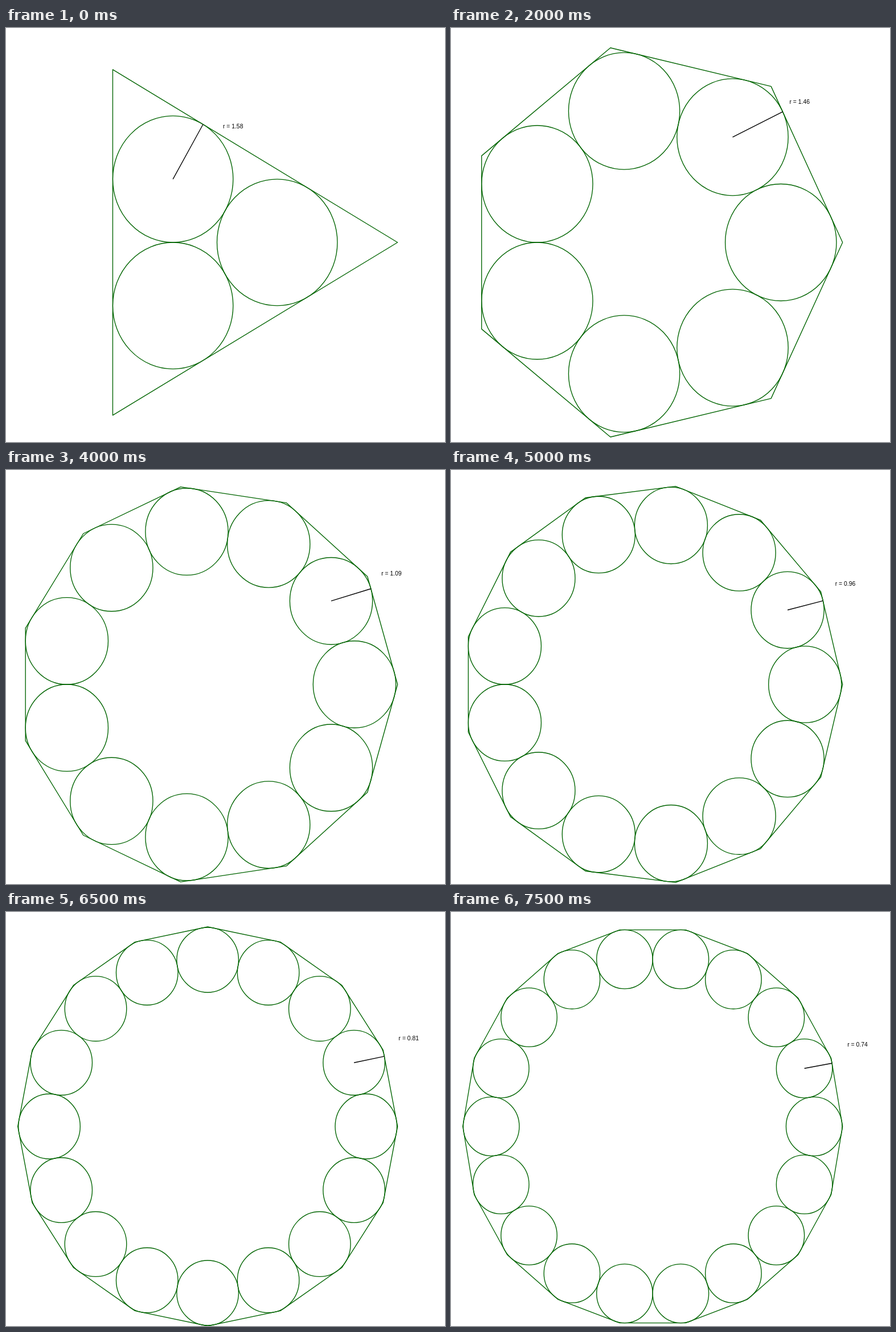
An HTML page with a canvas that plays this animation: 771x726 px, repeating every 8 s.

```html
<!DOCTYPE html>
<html lang="en">
<head>
<meta charset="utf-8">
<title>Circles in a regular polygon</title>
<style>
html, body { margin: 0; width: 100%; height: 100%; overflow: hidden; background: #fff; }
canvas { display: block; }
</style>
</head>
<body>
<canvas id="stage" width="771" height="726"></canvas>
<script>
const ctx = document.getElementById('stage').getContext('2d');
const STEP = 500, FIRST = 3, COUNT = 16;
const R = 5, CX = 354.2, CY = 376, UX = 66.7, UY = 70;
const GREEN = '#006400';

const px = x => CX + x * UX;
const py = y => CY - y * UY;
const polar = (d, a) => [d * Math.cos(a), d * Math.sin(a)];

function stroke(color) {
  ctx.strokeStyle = color;
  ctx.stroke();
}

function draw(n) {
  const half = Math.PI / n;
  const c = Math.cos(half), s = Math.sin(half);
  const d = R * c / (c + s);
  const r = d * s;

  ctx.fillStyle = '#fff';
  ctx.fillRect(0, 0, 771, 726);
  ctx.lineWidth = 1.35;
  ctx.lineJoin = 'round';

  ctx.beginPath();
  for (let i = 0; i < n; i++) {
    const [x, y] = polar(R, 2 * half * i);
    ctx.lineTo(px(x), py(y));
  }
  ctx.closePath();
  stroke(GREEN);

  for (let i = 0; i < n; i++) {
    const [x, y] = polar(d, 2 * half * i);
    ctx.beginPath();
    ctx.ellipse(px(x), py(y), r * UX, r * UY, 0, 0, 2 * Math.PI);
    stroke(GREEN);
  }

  // radius to the tangent point on the first side
  const [mx, my] = polar(d, 2 * half);
  const ex = mx + r * c, ey = my + r * s;
  ctx.beginPath();
  ctx.moveTo(px(mx), py(my));
  ctx.lineTo(px(ex), py(ey));
  stroke('#000');

  // the label follows the radius line at a fixed offset
  const tx = 0.45 * mx + 0.52 * ex + 1.142;
  const ty = 0.408 * my + 0.578 * ey + 0.553;
  ctx.fillStyle = '#000';
  ctx.font = '10.4px "Liberation Sans", Arial, sans-serif';
  ctx.textAlign = 'center';
  ctx.fillText('r = ' + r.toFixed(2), px(tx), py(ty) + 4);
}

let shown = 0;
function frame(now) {
  const n = FIRST + Math.floor(now / STEP) % COUNT;
  if (n !== shown) draw(shown = n);
  requestAnimationFrame(frame);
}
frame(0);
</script>
</body>
</html>
```
